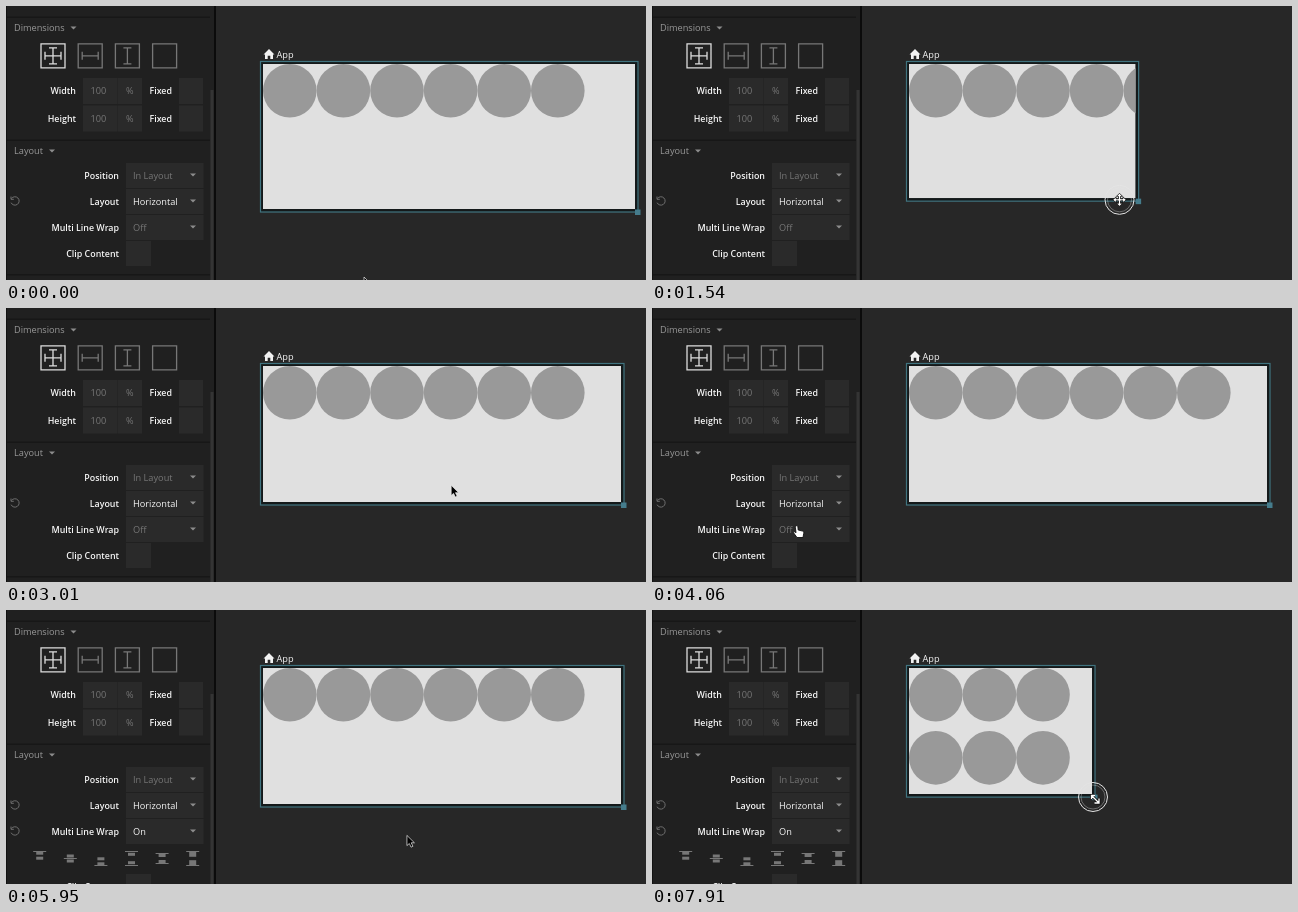
Write an HTML page that moves like this. It is 640 px wide and 274 px high and loops after 8 s.

```html
<!DOCTYPE html>
<html lang="en">
<head>
<meta charset="utf-8">
<title>Multi line wrap</title>
<style>
  html, body { margin: 0; width: 100%; height: 100%; overflow: hidden; background: #272727; }
  svg { display: block; }
  #stage { width: 100vw; height: 100vh; }
  text { font: 9.2px "Open Sans", "Noto Sans", sans-serif; fill: #f6f6f6; }
  .label { font-size: 8.9px; font-weight: 600; text-anchor: end; }
  .heading { fill: #999; }
  .dim { fill: #777; }
  .field { fill: #2a2a2a; }
  .line { fill: none; stroke: #777; }
</style>
</head>
<body>
<svg id="stage" viewBox="0 0 640 274" preserveAspectRatio="xMinYMin meet">
  <rect width="640" height="274" fill="#272727"/>
  <g id="canvas">
    <path d="M257.5 48.5 263 43l5.500 5.500h-1.500V53h-2.700v-3.200h-2.600V53H259v-4.500z" fill="#f2f2f2"/>
    <text x="270.500" y="51.500">App</text>
    <rect id="outline" x="254.500" y="55.500" fill="#14191a" stroke="#40737f" stroke-width="1.200"/>
    <svg id="frame" x="257" y="58" overflow="hidden">
      <rect width="100%" height="100%" fill="#e0e0e0"/>
      <g id="circles" fill="#999"></g>
    </svg>
    <rect id="handle" width="5.500" height="5.500" fill="#457c8c"/>
  </g>
  <g id="panel"></g>
  <g id="pointer">
    <g id="ring" fill="none" stroke="#e4e4e4">
      <circle id="outerRing" stroke-width="1"/>
      <circle id="innerRing" stroke-width=".6" opacity=".6"/>
    </g>
    <path id="arrow" d="M0 0v10.200l2.400-2.100 1.700 3.700 1.900-.9-1.700-3.500h3.200z" fill="#000" stroke="#eee" stroke-width=".7"/>
    <path id="hand" d="M-1 0c1-.8 1.800 0 1.900.9l.3 3.100 4.500 1.100c1.200.4 1.200 1.300 1 2.500L6 11.500H0L-3.300 7c-.6-1 .6-1.700 1.500-.9l.8.7-.7-5.700q0-.8.700-1.100z" fill="#fff" stroke="#111" stroke-width=".9"/>
    <g id="diagonal" fill="none">
      <path id="diagonalLine" d="M-1-1 5.500 5.500M-1.500 2V-1.500H2M6 1.500V6H1.500" stroke="#111" stroke-width="3"/>
      <use href="#diagonalLine" style="display:none"/>
      <path d="M-1-1 5.500 5.500M-1.500 2V-1.500H2M6 1.500V6H1.500" stroke="#fff" stroke-width="1.300"/>
    </g>
    <path id="cross" d="M0-6.500 3-3.500H1V-1H3.500V-3L6.500 0 3.500 3V1H1V3.500H3L0 6.500-3 3.500H-1V1H-3.500V3L-6.500 0-3.500-3V-1H-1V-3.500H-3z" fill="#fff" stroke="#111" stroke-width=".8"/>
  </g>
</svg>
<script>
const LOOP = 8000, LAG = 50, DIAMETER = 53.6, COUNT = 6;
const OPEN_AT = 4240, SELECT_AT = 5300;
const $ = id => document.getElementById(id);
const show = (id, visible) => $(id).setAttribute('display', visible ? 'inline' : 'none');
const set = (id, attrs) => {
  for (const name in attrs) $(id).setAttribute(name, attrs[name]);
};

// Panel pieces
const rect = (x, y, w, h, attrs = 'class="field"') =>
  `<rect x="${x}" y="${y}" width="${w}" height="${h}" ${attrs}/>`;
const text = (x, y, content, cls = '') => `<text x="${x}" y="${y}" class="${cls}">${content}</text>`;
const caret = (x, y) => `<path d="M${x - 3} ${y - 1.5}h6l-3 3z" fill="#8c8c8c"/>`;
const divider = y => rect(1, y, 203, 1.5, 'fill="#171717"');
const undo = y =>
  `<path class="line" d="M5.500 ${y - 2.5}a4.200 4.200 0 1 1-.4 4.200M5 ${y - 4.5}v2.800h2.800" stroke-width=".9"/>`;
const label = (y, name) => text(113, y + 16, name, 'label');
const select = (y, name, value, cls) =>
  label(y, name) + rect(120, y, 77.5, 25) + text(127, y + 16, value, cls) + caret(187, y + 12);
const clipRow = y => label(y, 'Clip Content') + rect(120, y, 25, 25);
const heading = (y, name, caretX) => text(8, y + 3.3, name, 'heading') + caret(caretX, y);
const size = (y, name) =>
  text(70, y + 16, name, 'label') + rect(77, y, 34, 26) + rect(111.5, y, 24.5, 26) +
  text(84.5, y + 16, '100', 'dim') + text(120, y + 16, '%', 'dim') +
  text(166, y + 16, 'Fixed', 'label') + rect(173, y, 24, 26);

const beamH = 'M-8 0H8M-8-4V4M8-4V4', beamV = 'M0-8V8M-4-8H4M-4 8H4';
const sizeIcons = [beamH + beamV, beamH, beamV, ''].map((beams, i) =>
  `<path class="line" transform="translate(${47 + 37.2 * i} 49.800)" d="M-12-12H12V12H-12z${beams}"
    style="stroke:${i ? '#777' : '#ddd'}" stroke-width="1.300"/>`).join('');

// Two bars hang on one guide, or one bar hangs on each of two guides
const alignIcons = [[-7], [0], [7], [-7, 7], [-5, 5], [-7, 7]].map((guides, i) => {
  const bars = guides.length > 1 ? guides.map(y => y * .6) : [-2.5, 2.5].map(y => y + guides[0] * .4);
  const height = i === 5 ? 5 : 3;
  return `<g transform="translate(${33.7 + 30.6 * i} 248.500)" fill="#777">` +
    guides.map(y => rect(-6.5, y - .5, 13, 1, '')).join('') +
    bars.map(y => rect(-3.5, y - height / 2, 7, height, '')).join('') + '</g>';
}).join('');

$('panel').innerHTML =
  rect(0, 0, 208, 274, 'fill="#202020"') + rect(208, 0, 2, 274, 'fill="#0b0b0b"') +
  rect(0, 0, 1, 274, 'fill="#121212"') + divider(10.5) + divider(133.5) +
  rect(204.5, 84, 3, 190, 'fill="#343434"') +
  heading(22, 'Dimensions', 67.5) + sizeIcons + size(72, 'Width') + size(99.5, 'Height') +
  heading(145, 'Layout', 46) + select(157, 'Position', 'In Layout', 'dim') +
  select(183, 'Layout', 'Horizontal') + undo(195) +
  `<g id="wrapOff">${select(209, 'Multi Line Wrap', 'Off', 'dim')}${clipRow(235)}${divider(268)}</g>` +
  `<g id="wrapOn">${select(209, 'Multi Line Wrap', 'On')}${undo(221)}${alignIcons}${clipRow(264)}</g>` +
  `<g id="menu">${rect(120, 209, 77.5, 65, 'fill="#000"')}${rect(120, 234, 77.5, .7, 'fill="#333"')}
    ${rect(120, 234.5, 77.5, 22.5, 'id="highlight" fill="#858585"')}
    ${text(127, 225, 'Off')}${caret(187, 221)}${text(127, 249.3, 'Off')}${text(127, 272.3, 'On')}</g>`;

$('circles').innerHTML = `<circle r="${DIAMETER / 2}"/>`.repeat(COUNT);
const circles = [...$('circles').children];

// Pointer moves: each eases from where the one before it ended
const smooth = u => u * u * (3 - 2 * u);
const slowDown = u => 1 - (1 - u) ** 1.45;
const move = (start, end, x, y, ease = smooth, arc = 0) => ({ start, end, x, y, ease, arc });
const moves = [
  move(0, 760, 632, 206),
  move(820, 1000, 628, 205),
  move(1050, 1740, 427, 191),
  move(1740, 2620, 618, 197),
  move(2660, 3460, 195, 192, smooth, -18),
  move(3460, 4000, 145, 218),
  move(4260, 4760, 144, 259),
  move(5650, 6220, 618, 197),
  move(6840, 7910, 441, 187, slowDown)
];
const drags = [{ start: 770, end: 2660 }, { start: 6840, end: LOOP }];
const clicks = [{ start: 4070, end: 4190 }, { start: 5150, end: 5300 }];
const during = (spans, t) => spans.find(({ start, end }) => t >= start && t < end);

function pointerAt(t) {
  let x = 358, y = 271;
  for (const m of moves) {
    if (t < m.start) break;
    const u = Math.min(1, (t - m.start) / (m.end - m.start)), k = m.ease(u);
    x += (m.x - x) * k;
    y += (m.y - y) * k + m.arc * Math.sin(Math.PI * u);
  }
  return [x, y];
}

// The corner trails the pointer and rests where the latest drag left it
function cornerAt(t) {
  const late = t - LAG;
  const drag = drags.findLast(({ start }) => late >= start) || drags[0];
  return pointerAt(Math.min(Math.max(late, drag.start), drag.end));
}

function drawFrame([cx, cy], wrap) {
  const width = cx - 260, height = cy - 61;
  set('outline', { width: cx - 254.5, height: cy - 55.5 });
  set('handle', { x: cx - 3, y: cy - 2.5 });
  set('frame', { width, height });
  const perRow = wrap ? Math.max(1, Math.min(COUNT, Math.floor(width / DIAMETER))) : COUNT;
  const rowHeight = height / Math.ceil(COUNT / perRow);
  circles.forEach((circle, i) => {
    circle.setAttribute('cx', DIAMETER * (i % perRow + .5));
    circle.setAttribute('cy', DIAMETER / 2 + rowHeight * Math.floor(i / perRow));
  });
}

function drawPointer(t, [x, y], [cx, cy]) {
  const drag = during(drags, t), press = drag || during(clicks, t);
  let kind = 'arrow';
  if (t > 3900 && t < 5700) kind = 'hand';
  else if (drag) kind = x < cx - 5 ? 'cross' : 'diagonal';
  else if (Math.hypot(x - cx, y - cy) < 5) kind = 'diagonal';

  for (const id of ['arrow', 'hand', 'diagonal', 'cross']) show(id, id === kind);
  set('pointer', { transform: `translate(${x} ${y})` });
  show('ring', press);
  if (press) {
    const r = 14.5 + 8 * Math.max(0, 1 - (t - press.start) / 256);
    set('outerRing', { r });
    set('innerRing', { r: r - 2.5 });
  }
}

function render() {
  const t = performance.now() % LOOP;
  const pointer = pointerAt(t), corner = cornerAt(t), wrap = t >= SELECT_AT;
  drawFrame(corner, wrap);
  show('wrapOff', !wrap);
  show('wrapOn', wrap);
  show('menu', t >= OPEN_AT && !wrap);
  show('highlight', pointer[1] > 234);
  set('highlight', { y: pointer[1] > 256 ? 257 : 234.5 });
  drawPointer(t, pointer, corner);
  requestAnimationFrame(render);
}
render();
</script>
</body>
</html>
```
